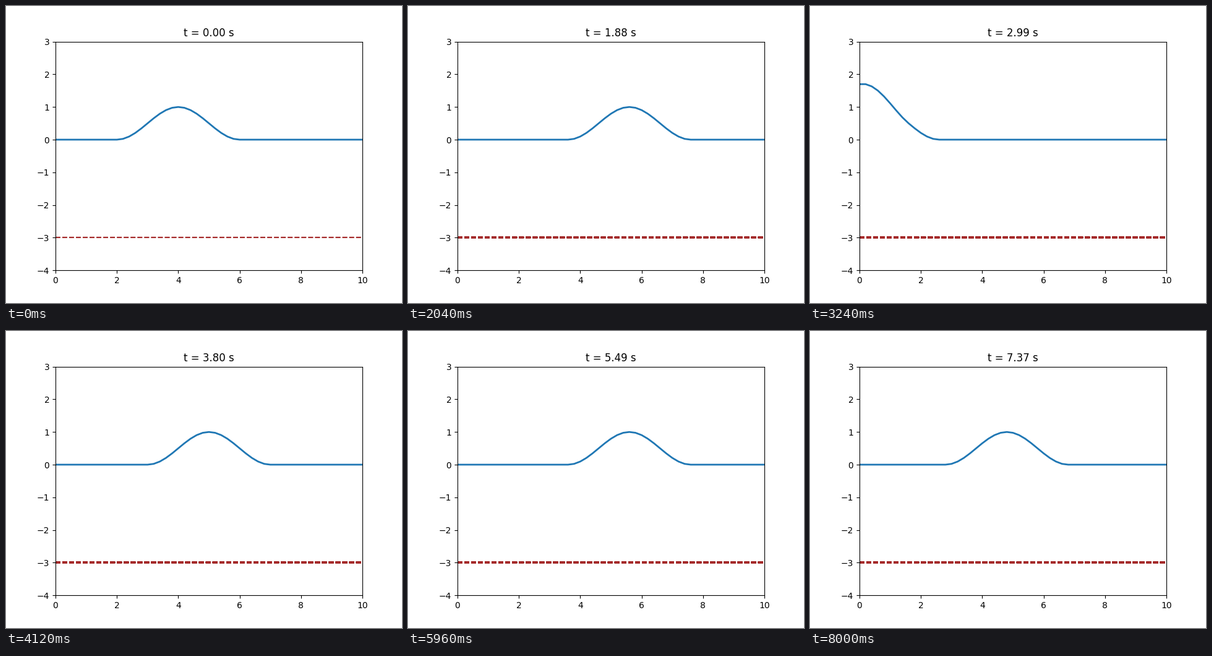
Write a matplotlib script that moves like this. It is 640 px wide and 480 px high and loops after 8.04 s.

```python
import numpy as np
import matplotlib.pyplot as plt
from matplotlib.animation import FuncAnimation

LENGTH, DEPTH, GRAVITY = 10.0, 3.0, 9.81
CELLS, FRAMES, INTERVAL = 50, 201, 40
DX = LENGTH / CELLS
DT = DX / np.sqrt(GRAVITY * DEPTH)  # Courant number 1: one cell per step
SPAN = 2 * (LENGTH - DX)            # distance travelled in one round trip
MAX_BED = 80                        # overlapping bed strokes look solid by then

x = np.linspace(0, LENGTH, CELLS + 1)


def pulse(center):
    """Cosine hump of half-width 2, repeated every SPAN."""
    d = (x - center + SPAN / 2) % SPAN - SPAN / 2
    return np.where(np.abs(d) < 2, 0.5 * (1 + np.cos(np.pi * d / 2)), 0)


def surface(step):
    """Right-going wave plus its mirror image in the end walls."""
    center = 4 + step * DX
    return pulse(center) + pulse(2 * LENGTH - DX - center)


fig, ax = plt.subplots(figsize=(6.4, 4.8), dpi=100)
ax.set_xlim(0, LENGTH)
ax.set_ylim(-4, 3)
wave, = ax.plot(x, surface(0), color="C0", lw=2)
# The bed is stroked once more each step, so its soft edges build up.
beds = [ax.plot([0, LENGTH], [-DEPTH, -DEPTH], "--", color="brown")[0]
        for _ in range(MAX_BED)]
title = ax.set_title("")


def update(step):
    wave.set_ydata(surface(step))
    title.set_text(f"t = {step * DT:.2f} s")
    for i, bed in enumerate(beds):
        bed.set_visible(i < step + 2)
    return [wave, title, *beds]


anim = FuncAnimation(fig, update, frames=FRAMES, interval=INTERVAL,
                     repeat=True, repeat_delay=0, blit=False)
plt.show()
```
